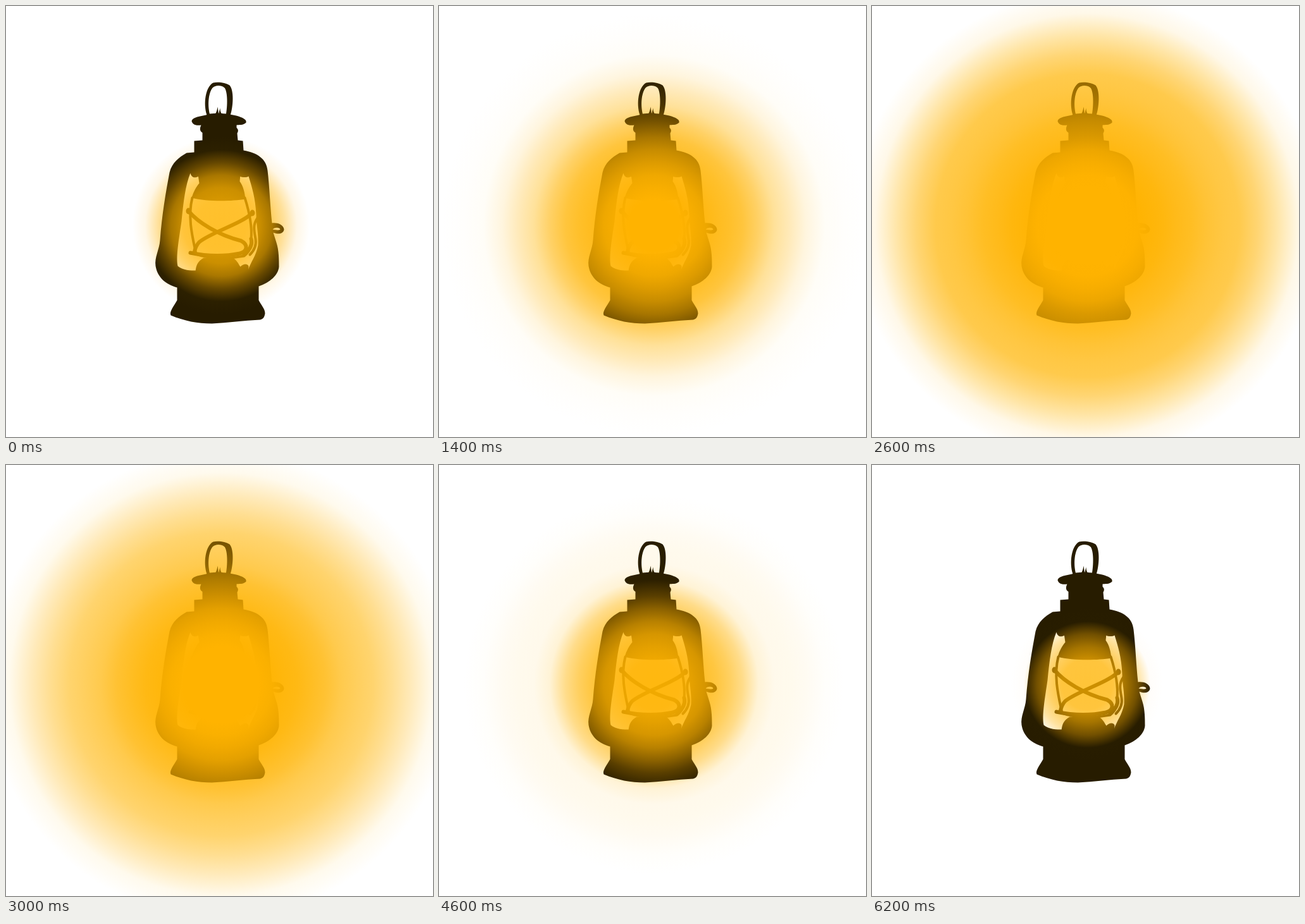
Write an HTML page with a canvas that moves like this. It is 675 px wide and 682 px high and loops after 6600 ms.

```html
<!DOCTYPE html>
<html>
<head>
<meta charset="utf-8">
<title>Lantern</title>
<style>
html, body { margin: 0; width: 100%; height: 100%; overflow: hidden; background: #fff }
canvas { display: block }
</style>
</head>
<body>
<canvas id="stage" width="675" height="682"></canvas>
<script>
const ctx = document.getElementById('stage').getContext('2d');
const STEP = 200, LOOP = 6600, CX = 340, CY = 347;
const AMBER = [255, 179, 0], WHITE = [255, 255, 255], DARK = [39, 28, 0];

// Glow strength at each radius, from the weakest to the strongest light
const radii = [0, 40, 60, 80, 100, 120, 140, 165, 190, 215, 240, 270, 300, 335, 370];
const R = radii[radii.length - 1];
const ember = [.78, .76, .6, .37, .02];
const low = [.83, .82, .77, .62, .39, .1];
const mid = [.94, .93, .88, .82, .74, .62, .46, .16, .08, .07, .05, .015];
const high = [1, 1, .97, .93, .88, .83, .76, .6, .4, .27, .13, .03, .01];
const full = [1, 1, 1, .98, .95, .92, .87, .8, .7, .63, .57, .43, .27, .07];

const mix = (a, b, k) => a + (b - a) * k;
const blend = (p, q, k) => radii.map((_, i) => Math.min(1, mix(p[i] || 0, q[i] || 0, k)));
const peak = blend(high, full, 1.3);

// [step, glow]
const keys = [[0, low], [5, mid], [7, high], [11, full], [13, peak], [15, full],
  [19, high], [23, mid], [30, low], [31, ember], [33, ember]];

function glowAt(step) {
  const i = keys.findIndex(k => k[0] > step);
  const [s0, a] = keys[i - 1], [s1, b] = keys[i];
  return blend(a, b, (step - s0) / (s1 - s0));
}

function light(base, glow, power) {
  const g = ctx.createRadialGradient(CX, CY, 0, CX, CY, R);
  radii.forEach((r, i) => {
    const k = glow[i] ** power(r);
    g.addColorStop(r / R, `rgb(${base.map((c, j) => Math.round(mix(c, AMBER[j], k)))})`);
  });
  return g;
}

const handle = new Path2D(`M317 172C311 154 315 127 327 121C335 119 347 121 353 125
  C360 133 359 158 354 173L347 173C350 157 350 135 345 129C339 124 330 125 326 129
  C319 138 318 158 322 172Z M328 173C332 169 333 165 334 159L336 173Z
  M335 173L338 161C338 167 340 170 343 173Z`);

const body = new Path2D(`M293 182C294 174 312 174 322 170C340 168 355 171 367 174
  C376 177 380 180 379 184C374 189 368 187 364 188V192C368 196 366 199 365 201L366 212
  L374 213L375 228C397 232 411 241 413 260C416 285 417 315 420 343C428 342 438 345 439 353
  C438 361 428 361 422 358L427 374C431 386 431 402 431 412C430 425 417 437 399 443V465
  C402 472 409 478 409 486C408 492 406 495 401 496C375 497 350 501 325 502
  C302 502 282 498 260 489C257 483 266 473 270 465V445C252 440 239 429 236 411
  C234 397 242 385 243 370C246 330 252 295 258 263C262 247 273 239 285 232L297 231V213
  L310 212V200C305 197 306 192 308 188C301 189 295 188 293 182Z
  M291 264C283 283 280 310 277 340C273 368 268 395 271 411C279 418 292 418 300 418
  H382C386 405 395 395 398 378C399 360 395 345 395 330C394 304 388 285 383 269
  C380 271 373 271 369 269H304C299 272 293 272 291 264Z
  M421 353C425 349 432 350 433 353C431 355 426 354 421 353Z`);

const burner = new Path2D(`M303 266H370L369 277C375 285 377 296 378 305
  C354 309 316 309 293 303C296 293 300 286 305 280Z
  M299 420C300 410 302 404 312 398H358C365 402 367 408 370 412C375 407 381 407 383 411V420Z`);

const wires = new Path2D(`M288 324C303 342 335 362 371 371C384 378 380 388 369 391
  C340 397 310 394 291 390M389 327C370 345 325 357 305 373C300 378 298 385 297 390
  M387 368C390 378 384 386 376 393`);

const rims = new Path2D(`M294 303C286 335 295 368 300 392C320 400 350 400 376 395
  C385 388 387 380 387 368C389 346 384 325 377 303M397 335C389 346 392 356 394 368
  C396 380 390 388 385 393`);

const knobs = new Path2D('M292 324A4 5 0 1 1 284 324A4 5 0 1 1 292 324ZM393 327A4 5 0 1 1 385 327A4 5 0 1 1 393 327Z');

function draw(now) {
  const glow = glowAt(Math.floor(now % LOOP / STEP));
  ctx.setTransform(1, 0, 0, 1, 0, 0);
  ctx.fillStyle = light(WHITE, glow, () => 1);
  ctx.fillRect(0, 0, 675, 682);
  // Metal takes on less of the light the farther it is from the flame
  ctx.fillStyle = ctx.strokeStyle = light(DARK, glow, r => Math.max(1.05, Math.min(2, r / 75)));
  ctx.translate(.5, .5);
  ctx.fill(body, 'evenodd');
  for (const part of [handle, burner, knobs]) ctx.fill(part);
  ctx.lineCap = ctx.lineJoin = 'round';
  ctx.lineWidth = 6;
  ctx.stroke(wires);
  ctx.lineWidth = 4;
  ctx.stroke(rims);
}

const start = performance.now();
function tick() {
  draw(performance.now() - start);
  requestAnimationFrame(tick);
}
tick();
</script>
</body>
</html>
```
